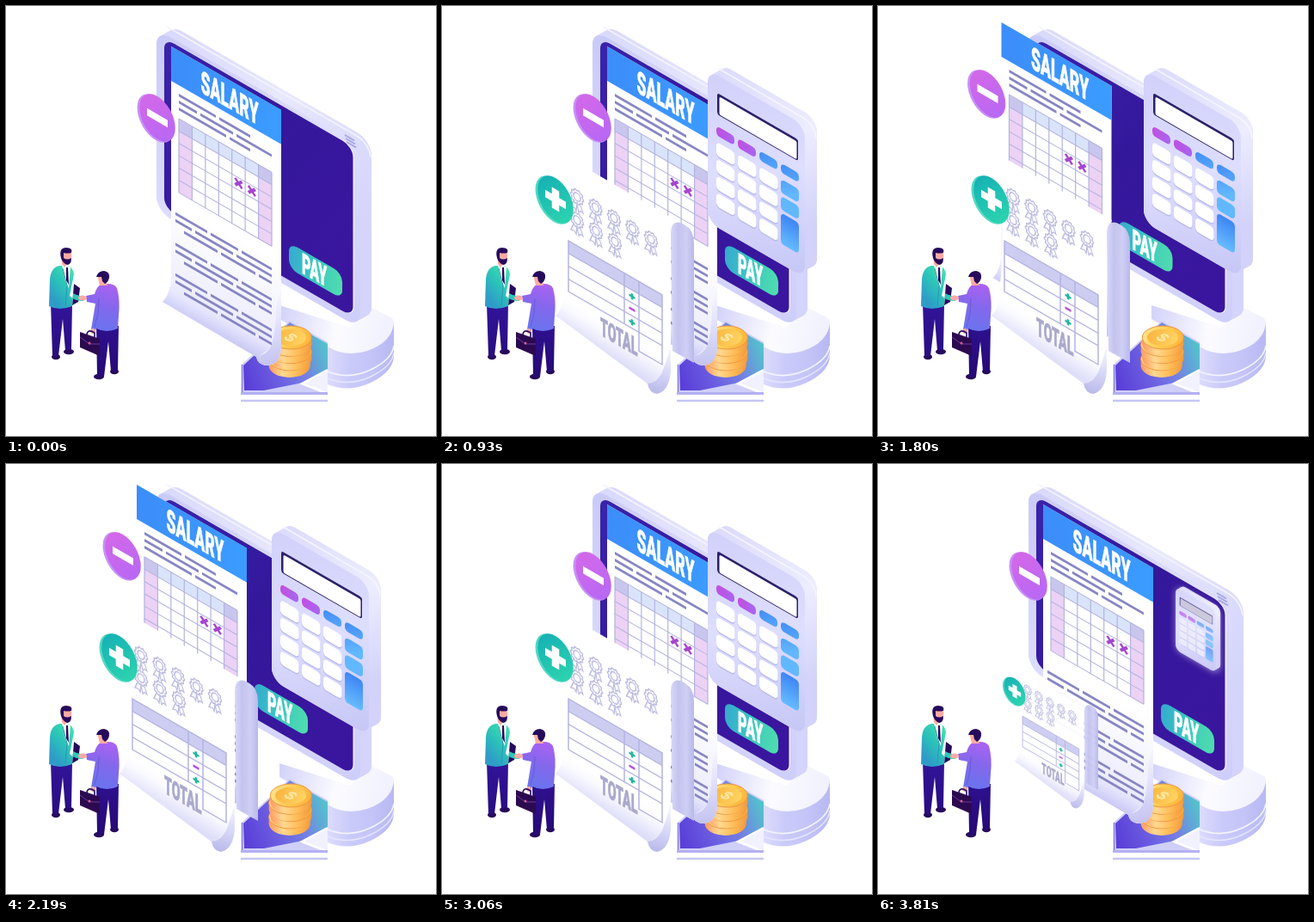
An HTML page with a canvas for the animation above (3.84 s loop, 500 by 500 pixels).

```html
<!DOCTYPE html>
<html lang="en">
<head>
<meta charset="utf-8">
<title>Salary payment</title>
<style>
  html, body { margin: 0; width: 100%; height: 100%; overflow: hidden; background: #fff; }
  canvas { display: block; width: 100vw; height: 100vh; }
</style>
</head>
<body>
<canvas id="stage" width="500" height="500"></canvas>
<script>
const c = document.getElementById('stage').getContext('2d');
const LOOP = 3840;
const SLOPE = 0.577;
const CONDENSED = 0.49;

// ---------- helpers ----------
function lin(x0, y0, x1, y1, ...cols) {
  const g = c.createLinearGradient(x0, y0, x1, y1);
  cols.forEach((col, i) => g.addColorStop(i / (cols.length - 1), col));
  return g;
}
function shape(d, fill) {
  c.fillStyle = fill;
  c.fill(new Path2D(d));
}
function trace(d, stroke, width) {
  c.strokeStyle = stroke;
  c.lineWidth = width;
  c.stroke(new Path2D(d));
}
function box(x, y, w, h, r, fill) {
  c.beginPath();
  c.roundRect(x, y, w, h, r);
  c.fillStyle = fill;
  c.fill();
}
function oval(x, y, rx, ry, fill) {
  c.beginPath();
  c.ellipse(x, y, rx, ry, 0, 0, Math.PI * 2);
  c.fillStyle = fill;
  c.fill();
}
// Draws on an isometric wall whose local origin is (x, y).
function wall(x, y, draw) {
  c.save();
  c.transform(1, SLOPE, 0, 1, x, y);
  draw();
  c.restore();
}
function label(text, x, y, size, fill) {
  c.save();
  c.translate(x, y);
  c.scale(CONDENSED, 1);
  c.font = `800 ${size}px Roboto, "Liberation Sans", sans-serif`;
  c.lineJoin = 'round';
  c.fillStyle = c.strokeStyle = fill;
  c.lineWidth = 0.8;
  c.fillText(text, 0, 0);
  c.strokeText(text, 0, 0);
  c.restore();
}
// A slab on the wall, extruded back to the right.
function slab(x, y, w, h, r, depth, side, front) {
  for (let d = depth; d >= 0; d -= 0.5) {
    wall(x + d, y - d * 0.55, () => box(0, 0, w, h, r, side));
  }
  wall(x, y, () => box(0, 0, w, h, r, front));
}
function plus(x, y, len, thick, fill) {
  c.fillStyle = fill;
  c.fillRect(x - len / 2, y - thick / 2, len, thick);
  c.fillRect(x - thick / 2, y - len / 2, thick, len);
}
function minus(x, y, len, thick, fill) {
  c.fillStyle = fill;
  c.fillRect(x - len / 2, y - thick / 2, len, thick);
}
function badge(x, y, rim, from, to, sign) {
  wall(x - 1, y + 0.5, () => oval(0, 0, 21.5, 25.4, rim));
  wall(x + 1, y, () => {
    oval(0, 0, 20.8, 25, lin(-20, -15, 20, 20, from, to));
    sign(0, 0, 24, 8.5, '#fff');
  });
}

// ---------- timing ----------
const clamp = u => Math.min(1, Math.max(0, u));
const sine = u => (1 - Math.cos(Math.PI * clamp(u))) / 2;
function backOut(u, k) {
  const v = clamp(u) - 1;
  return 1 + v * v * ((k + 1) * v + k);
}
function backIn(u, k) {
  const v = clamp(u);
  return v * v * ((k + 1) * v - k);
}
function popScale(t, start, span, kick, leave) {
  if (t < 1800) return t <= start ? 0 : backOut((t - start) / span, kick);
  return 1 - backIn((t - leave) / 350, 2.6);
}
function pop(x, y, s, draw) {
  if (s <= 0) return;
  c.save();
  c.globalAlpha = Math.min(1, s * 1.6);
  c.translate(x, y);
  c.scale(s, s);
  c.translate(-x, -y);
  draw(s);
  c.restore();
}

// ---------- scene ----------
function base() {
  shape('M374 394V440Q398 450 424 438Q451 425 451 406V367Q449 390 420 400Q395 408 374 394Z',
    lin(374, 0, 451, 0, '#dcdcfd', '#cacafa', '#c4c4f8', '#b8b8f3'));
  trace('M374 425Q398 435 424 423Q449 411 451 395', '#f4f4ff', 1.8);
  trace('M374 433Q398 443 424 431Q449 419 451 403', '#e6e6ff', 1.5);
  shape('M318 348L400 374L425 351L447 362Q451 364 451 368Q449 391 420 401Q395 409 374 396L318 364Z',
    lin(320, 360, 450, 390, '#d4d4fa', '#fbfbff', '#f0f0ff'));
  // tray
  shape('M274 417L330 366L374 391V424L345 440L372 450H274Z', '#cfcff8');
  shape('M276 418L330 368L374 393V423L345 438L300 447H277Z',
    lin(278, 435, 374, 400, '#5a3fd8', '#6a5ce0', '#7480e4', '#52c4cc'));
  shape('M345 439L374 424V452Z', '#f1f1ff');
  trace('M372 450L344 439L374 423', '#fff', 2.5);
  trace('M274.500 417V450', '#8478e6', 1.5);
  trace('M273 450.500H374', '#b4b0f2', 3);
  trace('M273 459H374', '#c6c6f4', 2.5);
}

function monitor() {
  slab(175, 27, 237, 211, 17, 13, lin(0, 0, 240, 100, '#d8d8fb', '#e8e8ff', '#d4d4fc'),
    lin(0, 0, 237, 200, '#c9c9f8', '#dedeff', '#cecefa'));
  trace('M187 24L408 151Q422 160 424 176', '#f4f4ff', 1.5);
  for (let i = 0; i < 3; i++) trace(`M${394 + i} ${150 + i * 4}l11 6.500`, '#a6a6dc', 1.8);
  wall(184, 36.5, () => {
    box(0, 0, 221, 198.5, 13, '#f4f4ff');
    box(0, 0.5, 219.5, 198, 12, lin(0, 0, 222, 120, '#3a24ac', '#34189c', '#3a169e'));
  });
}

function payButton() {
  wall(329, 275, () => {
    box(0, 0, 62, 30, 10, lin(0, 0, 62, 10, '#35a8d0', '#3cc8c0', '#4fdcae'));
    label('PAY', 15, 26.5, 33, '#fff');
  });
}

function textRow(y, ...stops) {
  c.strokeStyle = '#8686c4';
  c.lineWidth = 3.2;
  c.beginPath();
  for (let i = 0; i < stops.length; i += 2) {
    c.moveTo(stops[i], y);
    c.lineTo(stops[i + 1], y);
  }
  c.stroke();
}
function paragraph(y) {
  textRow(y, 5, 42, 46, 78, 82, 117);
  textRow(y + 8, 5, 24, 28, 72, 76, 117);
  textRow(y + 16, 15, 54, 58, 98, 102, 117);
}

function calendar() {
  const w = 108, h = 86, cw = w / 7, ch = h / 6;
  c.fillStyle = '#fff';
  c.fillRect(0, 0, w, h);
  for (const col of [0, 6]) {
    c.fillStyle = '#ecd2f5';
    c.fillRect(col * cw, ch, cw, h - ch);
  }
  c.fillStyle = '#d9e4fa';
  c.fillRect(0, 0, w, ch);
  c.fillStyle = '#c9c6ee';
  c.fillRect(0, 0, cw, ch);
  c.fillRect(6 * cw, 0, cw, ch);
  c.strokeStyle = '#b3b3e0';
  c.lineWidth = 1.2;
  c.beginPath();
  for (let i = 0; i <= 7; i++) { c.moveTo(i * cw, 0); c.lineTo(i * cw, h); }
  for (let i = 0; i <= 6; i++) { c.moveTo(0, i * ch); c.lineTo(w, i * ch); }
  c.stroke();
  for (const col of [4, 5]) {
    const x = (col + 0.5) * cw, y = 2.45 * ch;
    trace(`M${x - 4} ${y - 4}l8 8m0 -8l-8 8`, '#a545cf', 3.2);
  }
}

function salarySheet() {
  shape('M192 47L320 121V395Q320 418 302 418Q292 416 291 408L182 344Q190 338 192 322Z',
    lin(270, 270, 232, 350, '#fff', '#f6f6ff', '#ececfe'));
  shape('M192 312Q191 336 182 344L291 408Q310 400 313 382Z',
    lin(255, 352, 240, 380, 'rgba(236,236,254,0)', '#e2e2fd', '#c9c9f4'));
  shape('M320 330V395Q320 418 302 418Q292 416 291 407Q303 406 308 396Q314 380 314 350Z',
    lin(300, 330, 312, 416, 'rgba(235,235,255,0)', '#e0e0fc', '#c4c4f0'));
  wall(192, 47, () => {
    c.fillStyle = lin(0, 0, 128, 0, '#3c8dfa', '#3b9cff');
    c.fillRect(0, 0, 128, 40);
    label('SALARY', 34.5, 33, 36, '#fff');
    textRow(51.5, 9, 52, 56, 92);
    textRow(59.5, 9, 30, 34, 72, 76, 117);
    textRow(67.5, 9, 64, 68, 92);
    paragraph(191.5);
    paragraph(227);
    paragraph(262.5);
  });
  wall(201, 131, calendar);
  badge(175, 130, '#c792f6', '#d568e8', '#b468f6', minus);
}

function coins() {
  for (let i = 3; i >= 0; i--) {
    const x = 330.5 + (i % 2 ? -0.8 : 0.8), y = 385.5 + i * 8.3;
    const edge = lin(x - 24, 0, x + 24, 0, '#ff9a62', '#ffd890', '#ffbe58', '#f39a3c');
    oval(x, y + 8, 24, 13.5, edge);
    c.fillRect(x - 24, y, 48, 8);
    oval(x, y, 24, 13.5, lin(x - 20, y - 10, x + 20, y + 10, '#ffe48c', '#ffcc50', '#fbb43c'));
    c.strokeStyle = '#ee9444';
    c.lineWidth = 1;
    c.stroke();
  }
  oval(331, 385.5, 18, 9.8, lin(313, 380, 349, 392, '#f8b440', '#ffd564'));
  c.save();
  c.transform(0.866, 0.5, -0.866, 0.5, 331, 385.5);
  c.font = 'bold 18px "Liberation Sans", Arial, sans-serif';
  c.textAlign = 'center';
  c.fillStyle = '#ffeaa8';
  c.fillText('$', 0, 6);
  c.restore();
}

function people() {
  const navy = lin(0, 345, 0, 430, '#32149a', '#260a76');
  const dark = '#260a5c', skin = '#ffaaa4';
  // bearded man
  oval(58, 408, 5, 3.2, dark);
  oval(73, 402, 6, 3.2, dark);
  shape('M52 346H77L76 399L69 401L66 364L61 407H54Z', navy);
  shape('M79 323L86 328L84 344L77 348Z', dark);
  shape('M62 302Q52 304 51 318L50 349Q62 355 77 349L78 334Q84 338 91 337L90 343Q79 343 74 337L79 312Q78 305 73 302Z',
    lin(50, 335, 80, 310, '#2e9cc8', '#2bc4b8', '#3fe2ae'));
  shape('M65 301L75 303L73 328L69 320Z', '#fff');
  shape('M70 304L72 304L73 324L70 319Z', dark);
  trace('M66 305L71 325L69 349', '#2a92b8', 1);
  shape('M64 288Q65 283 71 284Q77 284 76 292Q75 298 71 300L68 304L65 300Z', skin);
  shape('M64 293Q61 281 70 281Q78 281 76 287Q71 288 67 287L67 293Q71 296 76 293Q76 301 71 301Q66 299 64 293Z', dark);
  // man with the briefcase
  oval(108, 431, 6, 3.2, dark);
  oval(126, 425, 5, 3.2, dark);
  shape('M105 372H131L130 424L122 425L119 390L114 431H106Z', navy);
  shape('M110 324Q125 321 129 328Q133 342 131 360L130 375Q117 381 105 375L103 379L99 376L104 346L94 344L93 337L103 335Q105 327 110 324Z',
    lin(122, 324, 108, 376, '#aa62f2', '#8268ec', '#6a74ee'));
  trace('M108 340L107 357L103 373', '#6a5ad8', 1);
  shape('M107 316Q107 311 114 312L118 325L109 325Z', skin);
  shape('M105 315Q107 308 114 308Q121 309 120 316Q119 321 115 323L112 320L111 315Z', dark);
  oval(89, 339.5, 5, 3, skin);
  oval(101, 378, 2.8, 3, skin);
  trace('M94 382Q95 375 103 380L103 385', dark, 1.6);
  shape('M86 379L109 387V407L86 397Z', '#2c0a50');
  trace('M86 385L97 393L109 393', '#6a3a9c', 1);
  oval(97, 392, 1.4, 1.6, '#e0608c');
}

function rosette(x, y) {
  wall(x, y, () => {
    c.strokeStyle = '#bcbce2';
    c.lineWidth = 1.5;
    c.beginPath();
    for (let i = 0; i <= 60; i++) {
      const a = i / 60 * Math.PI * 2, r = 7 + 0.7 * Math.cos(a * 10);
      c.lineTo(r * Math.cos(a), r * 1.12 * Math.sin(a) - 2);
    }
    c.stroke();
    c.beginPath();
    c.ellipse(0, -2, 4, 4.6, 0, 0, 7);
    c.stroke();
    trace('M-4 5L-7 13L-3 12L-1 15L0 6L2 15L4 12L7 13L4 5', '#bcbce2', 1.3);
  });
}

function bonusTable() {
  c.fillStyle = '#cdcdf2';
  c.fillRect(0, 0, 109, 14.5);
  trace('M0 0H109V81H82V59H0ZM0 14.500H109M0 29.500H109M0 44.500H109M0 59H109M65 0V59M82 0V81', '#b4b4e2', 1.5);
  plus(74, 22, 7, 2.6, '#22b69e');
  minus(74, 37, 7, 2.8, '#b44fd8');
  plus(74, 52, 7, 2.6, '#22b69e');
  label('TOTAL', 37, 88, 29, '#a9a9cc');
}

function bonusSheet() {
  shape('M146 176L272 249L266 262V425Q264 448 250 451Q240 450 240 440L132 360Q141 352 141 330Q146 300 146 176Z', '#fff');
  shape('M141 330Q141 352 132 360L240 440Q256 432 262 418Z',
    lin(204, 372, 186, 402, 'rgba(255,255,255,0)', '#f4f4ff', '#dedef8'));
  shape('M266 395V425Q264 448 250 451Q241 450 239 439Q250 438 256 426Q260 416 266 395Z',
    lin(262, 398, 246, 450, '#f6f6ff', '#d8d8f8', '#b9b9ea'));
  shape('M266 264Q267 245 283 255Q293 261 293 276V415L268 401Z',
    lin(266, 0, 293, 0, '#d8d8fa', '#c3c3ee', '#cfcff5', '#b9b9ea'));
  for (let i = 0; i < 5; i++) rosette(157 + i * 21.5, 224 + i * 12.3);
  for (let i = 0; i < 3; i++) rosette(157 + i * 22, 251 + i * 12.5);
  wall(147, 273, bonusTable);
  badge(131, 225, '#52d9c4', '#15b0b4', '#2fd8ae', plus);
}

function calculator(s) {
  if (s < 0.95) {
    c.filter = 'blur(4px)';
    wall(312, 72, () => box(0, 0, 120, 178, 14, '#fff'));
    c.filter = 'none';
  }
  slab(309, 74, 113, 177, 14, 14, lin(0, 0, 113, 120, '#dadafc', '#ededff', '#d2d2fa'),
    lin(0, 0, 113, 177, '#d0d0fa', '#dedeff', '#c6c6f6'));
  trace('M322 73L420 130Q434 139 435 154', '#f5f5ff', 1.5);
  wall(320, 101, () => {
    box(0, 0, 94, 25, 3, '#2b2168');
    box(2.5, 3, 90, 21, 2, '#fff');
  });
  const pink = lin(-10, 0, 10, 0, '#c24fe0', '#a865f0');
  const blue = lin(-10, -10, 10, 20, '#3f86f4', '#62b8ff');
  // Keys are laid out on a 4-column grid.
  wall(329, 150, () => {
    for (let col = 0; col < 4; col++) {
      c.save();
      c.translate(col * 25, 0);
      box(-10, -5, 21, 11, 4.5, col < 2 ? pink : blue);
      for (let row = 0; row < 4 && col < 3; row++) {
        box(-10, 14 + row * 19.6, 21.5, 17, 4.5, '#b9b9ec');
        box(-10, 13.5 + row * 19.6, 21.5, 16, 4.5, '#fff');
      }
      if (col === 3) {
        box(-10, 13.5, 21, 16, 4.5, blue);
        box(-10, 33.1, 21, 16, 4.5, blue);
        box(-10, 52.7, 21, 36, 4.5, lin(0, 53, 0, 89, '#3f86f4', '#66bcff'));
      }
      c.restore();
    }
  });
}

function draw(t) {
  const slide = sine((t - 960) / 720) - sine((t - 1900) / 1060);
  const shifted = part => {
    c.save();
    c.translate(-48.5 * slide, -28 * slide);
    part();
    c.restore();
  };
  c.fillStyle = '#fff';
  c.fillRect(0, 0, 500, 500);
  base();
  monitor();
  shifted(payButton);
  coins();
  shifted(salarySheet);
  people();
  pop(200, 324, popScale(t, 0, 470, 2.6, 3507), bonusSheet);
  pop(372, 191.5, popScale(t, 120, 455, 3.4, 3490), calculator);
}

const begin = performance.now();
function frame() {
  draw((performance.now() - begin) % LOOP);
  requestAnimationFrame(frame);
}
draw(0);
requestAnimationFrame(frame);
</script>
</body>
</html>
```
